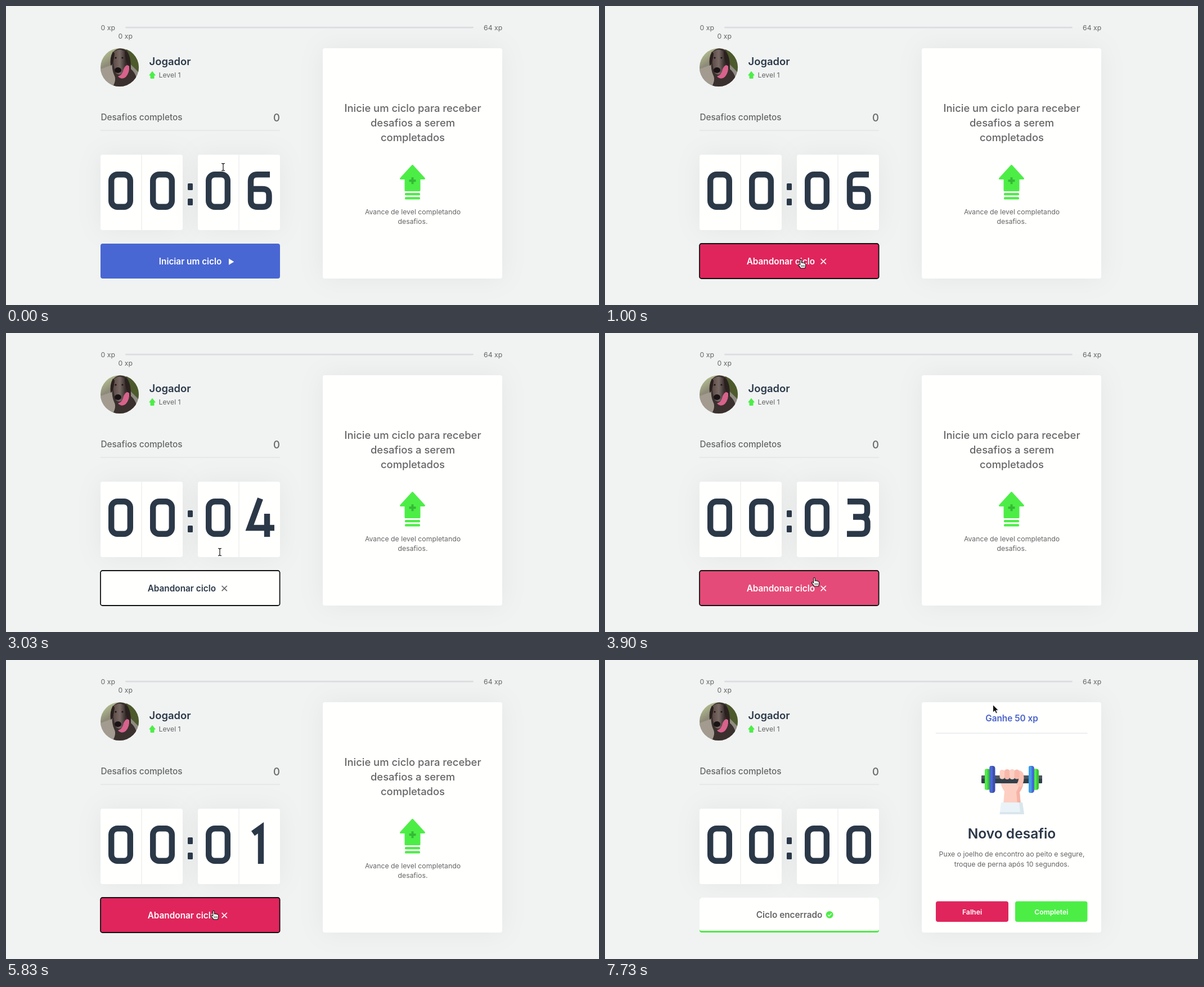
Animation of 1054x531 px, one loop 8000 ms. Source, as an HTML page:

```html
<!DOCTYPE html>
<html lang="pt-BR">
<head>
<meta charset="utf-8">
<title>Ciclo de desafios</title>
<style>
  html, body { margin: 0; width: 100%; height: 100%; overflow: hidden; background: #f0f3f2; }
  svg { display: block; width: 100%; height: 100%; }
  text { font: 400 12.27px Inter, sans-serif; fill: #666; }
  .mid { text-anchor: middle; }
  .end { text-anchor: end; }
  .t20 { font-size: 15.33px; font-weight: 600; }
  .t24 { font-size: 18.4px; font-weight: 500; }
  .medium { font-weight: 500; }
  .dark { fill: #2b3848; }
  .white { fill: #fff; }
  .card { fill: #fffffe; filter: drop-shadow(0 0 23px #0000000d); }
  .rule { stroke: #dcdde0; stroke-width: 1; }
  .digit { fill: none; stroke: #2b3848; stroke-width: 10.4; }

  .start, .running, .waiting, .finished, .ring, .strip, .glyphs, .label, .cross {
    animation: 8s step-end infinite;
  }
  .start { animation-name: start; }
  .running { animation-name: running; }
  .waiting { animation-name: waiting; }
  .finished { animation-name: finished; }
  .ring { animation-name: ring; }
  .strip { animation-name: count; }
  .glyphs { animation-name: glyphs; }
  .label { animation-name: label; }
  .cross { animation-name: cross; }
  .button { animation: button 8s ease infinite; }
  .cursor { animation: move 8s linear infinite; }

  @keyframes start { 0% { visibility: visible } 10%, 100% { visibility: hidden } }
  @keyframes running { 0% { visibility: hidden } 10% { visibility: visible } 85.375%, 100% { visibility: hidden } }
  @keyframes waiting { 0% { visibility: visible } 85.375%, 100% { visibility: hidden } }
  @keyframes finished { 0% { visibility: hidden } 85.375%, 100% { visibility: visible } }
  @keyframes ring { 0% { visibility: hidden } 9.625% { visibility: visible } 85.375%, 100% { visibility: hidden } }
  @keyframes label { 0% { fill: #fff } 34.5% { fill: #2b3848 } 47.45%, 100% { fill: #fff } }
  @keyframes cross { 0% { stroke: #fff } 34.5% { stroke: #666 } 47.45%, 100% { stroke: #fff } }
  @keyframes button {
    0%, 4.5% { fill: #4967d3 }
    7%, 10% { fill: #4953b8 }
    12.5%, 34.5% { fill: #e0255c }
    37%, 47.45% { fill: #fffffe }
    49.95%, 100% { fill: #e0255c }
  }
  /* One digit per 100px row, from 6 down to 0 */
  @keyframes count {
    0% { transform: none }
    22.5% { transform: translateY(-100px) }
    35.375% { transform: translateY(-200px) }
    47.875% { transform: translateY(-300px) }
    60.375% { transform: translateY(-400px) }
    72.875% { transform: translateY(-500px) }
    85.375%, 100% { transform: translateY(-600px) }
  }
  /* Columns: text beam, arrow, hand, forbidden */
  @keyframes glyphs {
    0% { transform: none }
    3.75% { transform: translateX(-60px) }
    4.5% { transform: translateX(-120px) }
    34.5% { transform: translateX(-60px) }
    36% { transform: none }
    46.6% { transform: translateX(-60px) }
    47.45% { transform: translateX(-120px) }
    85.375% { transform: translateX(-180px) }
    88.9% { transform: translateX(-60px) }
    89.4% { transform: none }
    90.9%, 100% { transform: translateX(-60px) }
  }
  @keyframes move {
    0% { transform: translate(386px, 286px) }
    1.25% { transform: translate(386px, 286px); animation-timing-function: ease }
    7.5% { transform: translate(348px, 450px) }
    33.375% { transform: translate(348px, 450px); animation-timing-function: ease-out }
    37.875%, 46.25% { transform: translate(380px, 389px) }
    47.5% { transform: translate(374px, 424px) }
    48.75% { transform: translate(372px, 434px) }
    50.875%, 85.375% { transform: translate(369px, 445px) }
    86.625% { transform: translate(366px, 443px) }
    87.5% { transform: translate(366px, 443px); animation-timing-function: ease-in-out }
    95.375% { transform: translate(696px, 77px); animation-timing-function: step-end }
    96.625%, 100% { transform: translate(689px, 79px) }
  }
</style>
</head>
<body>
<svg viewBox="0 0 1054 531">
  <defs>
    <clipPath id="avatar"><circle cx="202" cy="109" r="34"/></clipPath>
    <clipPath id="digitBox"><rect x="416" y="280" width="70" height="96"/></clipPath>
    <clipPath id="cursorBox"><rect x="-20" y="-20" width="50" height="50"/></clipPath>
    <linearGradient id="garden" x1="0" y1="0" x2=".6" y2="1">
      <stop offset="0" stop-color="#c5d49a"/>
      <stop offset=".4" stop-color="#8d8a78"/>
      <stop offset="1" stop-color="#8f8b86"/>
    </linearGradient>
    <linearGradient id="fur" x1="0" x2="1">
      <stop offset="0" stop-color="#5b4a45"/>
      <stop offset=".5" stop-color="#7a6a66"/>
      <stop offset="1" stop-color="#2c2423"/>
    </linearGradient>
    <rect id="zero" x="5.2" y="5.2" width="33.6" height="57.6" rx="11"/>
  </defs>

  <!-- Experience bar -->
  <text x="168.5" y="42.7">0 xp</text>
  <rect x="212" y="36.7" width="619" height="2.8" rx="1.4" fill="#dcdde0"/>
  <text x="199.5" y="58.3">0 xp</text>
  <text class="end" x="882.3" y="42.7">64 xp</text>

  <!-- Profile -->
  <g clip-path="url(#avatar)">
    <rect x="168" y="75" width="68" height="68" fill="url(#garden)"/>
    <path d="M213 75H236V118L222 104Z" fill="#4d5a2c"/>
    <path d="M168 112L190 104 196 143H168Z" fill="#a39b90"/>
    <path d="M190 82Q201 70 215 79Q222 90 222 112Q234 122 234 143H190Q197 130 192 122Q186 108 190 82Z" fill="#3a302e"/>
    <path d="M191 82Q202 73 212 82L214 110Q206 126 196 120Q189 106 191 82Z" fill="url(#fur)"/>
    <path d="M190 81Q184 92 186 106Q191 104 193 84ZM212 79Q224 88 221 113Q213 106 211 82Z" fill="#2a211f"/>
    <circle cx="195" cy="92" r="1.6" fill="#1c1514"/>
    <circle cx="207" cy="92" r="1.6" fill="#1c1514"/>
    <ellipse cx="199" cy="114" rx="6" ry="5" fill="#191315"/>
    <path d="M199 125Q207 123 209 112Q214 101 219 107Q220 118 213 126Q206 132 199 125Z" fill="#d8628c"/>
  </g>
  <text class="t24 dark" style="font-weight:600" x="254.6" y="105">Jogador</text>
  <path d="M260 116.3L265.3 123H263V128.5H257V123H254.8Z" fill="#4cee46" stroke="#4cee46" stroke-linejoin="round"/>
  <text x="271.5" y="127.3">Level 1</text>

  <text class="t20 medium" x="168.5" y="202.8">Desafios completos</text>
  <text class="t24 end" x="486.8" y="204.7">0</text>
  <path class="rule" d="M168 221H487"/>

  <!-- Timer -->
  <rect class="card" x="168" y="264" width="146" height="134" rx="4"/>
  <rect class="card" x="341" y="264" width="146" height="134" rx="4"/>
  <path d="M241 264V398M414 264V398" stroke="#f0f1f2" stroke-width="1.6"/>
  <g class="digit">
    <use href="#zero" x="182" y="294"/>
    <use href="#zero" x="256" y="294"/>
    <use href="#zero" x="355" y="294"/>
  </g>
  <g fill="#2b3848">
    <rect x="323" y="315" width="9" height="12" rx="1.5"/>
    <rect x="323" y="342" width="9" height="12" rx="1.5"/>
  </g>
  <g clip-path="url(#digitBox)">
    <g class="strip">
      <g class="digit" transform="translate(429 294)">
        <path d="M40 5.2H18Q6 5.2 6 17V51Q6 62.8 18 62.8H27Q38.5 62.8 38.5 51V42Q38.5 31 27 31H6"/>
        <path transform="translate(0 100)" d="M40 5.2H8V29H27Q38.5 29 38.5 41V51Q38.5 62.8 27 62.8H2"/>
        <path transform="translate(0 200)" d="M23 0L4 52H48M35 27V68"/>
        <path transform="translate(0 300)" d="M2 5.2H26Q37 5.2 37 15V23Q37 32.5 27 32.5H12M26 32.5Q37.5 33 37.5 43V51Q37.5 62.8 26 62.8H1"/>
        <path transform="translate(0 400)" d="M3 5.2H26Q37.5 5.2 37.5 16V22Q37.5 29 32 34L11 52Q7.500 55.500 7.500 62.8H42.500"/>
        <path transform="translate(0 500)" d="M10 14L24 4V68"/>
        <use href="#zero" y="600"/>
      </g>
    </g>
  </g>

  <!-- Cycle button -->
  <g class="waiting">
    <rect class="button" x="168" y="422" width="319" height="62" rx="4"/>
  </g>
  <rect class="ring" x="168" y="422" width="318.6" height="62" rx="3.5" fill="none" stroke="#101010" stroke-width="1.8"/>
  <g class="start">
    <text class="t20 white" x="271.8" y="459.3">Iniciar um ciclo</text>
    <path d="M396 448.6L405.300 454.2 396 459.800Z" fill="#fff"/>
  </g>
  <g class="running">
    <text class="t20 label" x="251.7" y="459.3">Abandonar ciclo</text>
    <path class="cross" d="M383.600 449L392.800 458.200M392.800 449L383.600 458.200" stroke-width="1.700"/>
  </g>
  <g class="finished">
    <rect x="168" y="422" width="319" height="62" rx="4" fill="#4cee46"/>
    <path d="M172 422H483Q487 422 487 426V478Q487 481 483 481H172Q168 481 168 478V426Q168 422 172 422Z" fill="#fffffe"/>
    <text class="t20" x="268.7" y="457.8">Ciclo encerrado</text>
    <circle cx="399.200" cy="452.300" r="6.400" fill="#4cee46"/>
    <path d="M396 452.500L398.300 454.800 402.600 450.300" fill="none" stroke="#fff" stroke-width="1.400"/>
  </g>

  <!-- Challenge panel -->
  <rect class="card" x="563" y="75" width="319" height="409" rx="4"/>
  <g class="waiting">
    <g class="mid">
      <text class="t24" x="723" y="188">Inicie um ciclo para receber</text>
      <text class="t24" x="723" y="213.800">desafios a serem</text>
      <text class="t24" x="723" y="239.500">completados</text>
      <text x="723" y="369.500">Avance de level completando</text>
      <text x="723" y="386.700">desafios.</text>
    </g>
    <g fill="#4cee46">
      <path d="M722.500 283.500L743.500 306.500H735V327.500H710V306.500H701.500Z" stroke="#4cee46" stroke-width="3" stroke-linejoin="round"/>
      <rect x="709" y="332" width="27" height="4.200" rx="1.500"/>
      <rect x="709" y="339.300" width="27" height="4.200" rx="1.500"/>
    </g>
    <path d="M716.500 310.300H728.500M722.500 304.300V316.300" stroke="#35b935" stroke-width="4"/>
  </g>
  <g class="finished">
    <text class="t20 mid" style="fill:#4862c8" x="723" y="108.700">Ganhe 50 xp</text>
    <path class="rule" d="M588 130H857.500"/>

    <path d="M703 216Q705 228 710 233L708 256H739L737 234Q744 226 744 211V203Q742 196 735 196H708Z" fill="#fdcfc2"/>
    <path d="M737 198Q745 200 744.500 211Q744 226 737 235L739 256H733L731 234Q738 224 735 213Z" fill="#f6b3a5"/>
    <rect x="669" y="205" width="108" height="14" rx="1.500" fill="#31404a"/>
    <path d="M670 205H776Q777 205 777 206V211H669V206Z" fill="#4d5560"/>
    <path d="M736 198Q745 199 744.500 211Q744 220 739 226L731 221Q736 215 735 207Z" fill="#fbc3b5"/>
    <g fill="#fdcfc2">
      <rect x="701.500" y="195" width="9" height="16.500" rx="4.200"/>
      <rect x="710" y="194" width="9.500" height="18" rx="4.500" fill="#f8b9ab"/>
      <rect x="719" y="194" width="9.500" height="18" rx="4.500"/>
      <rect x="727.500" y="194.500" width="9" height="17" rx="4.300" fill="#f8b9ab"/>
    </g>
    <path d="M704 253H742L745 274H701.500Z" fill="#eaf4f8"/>
    <path d="M736 253H742L745 274H701.500L702 270H738Z" fill="#d9e6ec"/>
    <g fill="#3cc436">
      <rect x="675" y="193.500" width="10" height="37" rx="4"/>
      <rect x="761" y="193.500" width="10" height="37" rx="4"/>
    </g>
    <g fill="#4cee46">
      <rect x="675" y="193.500" width="5" height="37" rx="2.500"/>
      <rect x="763" y="193.500" width="4" height="37"/>
    </g>
    <rect x="683.500" y="188" width="10" height="48" rx="4.500" fill="#3d4fae"/>
    <rect x="683.500" y="188" width="5.500" height="48" rx="2.700" fill="#4967d3"/>
    <rect x="753" y="188" width="10" height="48" rx="4.500" fill="#4967d3"/>
    <rect x="753" y="188" width="5.500" height="48" rx="2.700" fill="#3fa0e6"/>

    <g class="mid">
      <text class="dark" style="font-size:24.530px;font-weight:600" x="723" y="317">Novo desafio</text>
      <text x="723" y="349">Puxe o joelho de encontro ao peito e segure,</text>
      <text x="723" y="367.300">troque de perna após 10 segundos.</text>
      <rect x="588" y="428.500" width="129" height="36.500" rx="4" fill="#e0255c"/>
      <rect x="729" y="428.500" width="128.500" height="36.500" rx="4" fill="#4cee46"/>
      <text class="white" style="font-weight:600" x="652.500" y="451.500">Falhei</text>
      <text class="white" style="font-weight:600" x="793.300" y="451.500">Completei</text>
    </g>
  </g>

  <!-- Pointer -->
  <g class="cursor">
    <g clip-path="url(#cursorBox)">
      <g class="glyphs">
        <g fill="none">
          <path id="beam" d="M-3 -6.500Q0 -6.500 0 -5V5Q0 6.500 -3 6.500M3 -6.500Q0 -6.500 0 -5V5Q0 6.500 3 6.500" stroke="#fff" stroke-width="2.600"/>
          <path d="M-3 -6.500Q0 -6.500 0 -5V5Q0 6.500 -3 6.500M3 -6.500Q0 -6.500 0 -5V5Q0 6.500 3 6.500" stroke="#111" stroke-width="1.200"/>
        </g>
        <path transform="translate(60 0)" d="M.5 .5V14L3.800 11.200 6 16 8.300 15 6.200 10.300H10.300Z" fill="#111" stroke="#fff" stroke-width=".9"/>
        <g transform="translate(120 0)" stroke="#111" stroke-linejoin="round" stroke-linecap="round">
          <path d="M-1.300 1.200Q0 -.6 1.300 1.200V6Q2.800 5 3.900 6.300Q5.300 5.500 6.300 6.900Q8.300 6.500 8.600 8.500V11.500Q8.300 13.500 7.300 15.800H-.2Q-1 13.800 -4.600 10Q-5 7.800 -3 8.300L-1.300 9.800Z" fill="#fff" stroke-width="1.100"/>
          <path d="M1.300 10.500V13M3.700 10.500V13M6 10.500V13" stroke-width=".9"/>
        </g>
        <g transform="translate(180 0)" fill="none">
          <circle r="5.500" stroke="#fff" stroke-width="4"/>
          <circle r="5.500" fill="#fff" fill-opacity=".6" stroke="#111" stroke-width="2.500"/>
          <path d="M-3.800 3.800L3.800 -3.800" stroke="#111" stroke-width="2.500"/>
        </g>
      </g>
    </g>
  </g>
</svg>
</body>
</html>
```
